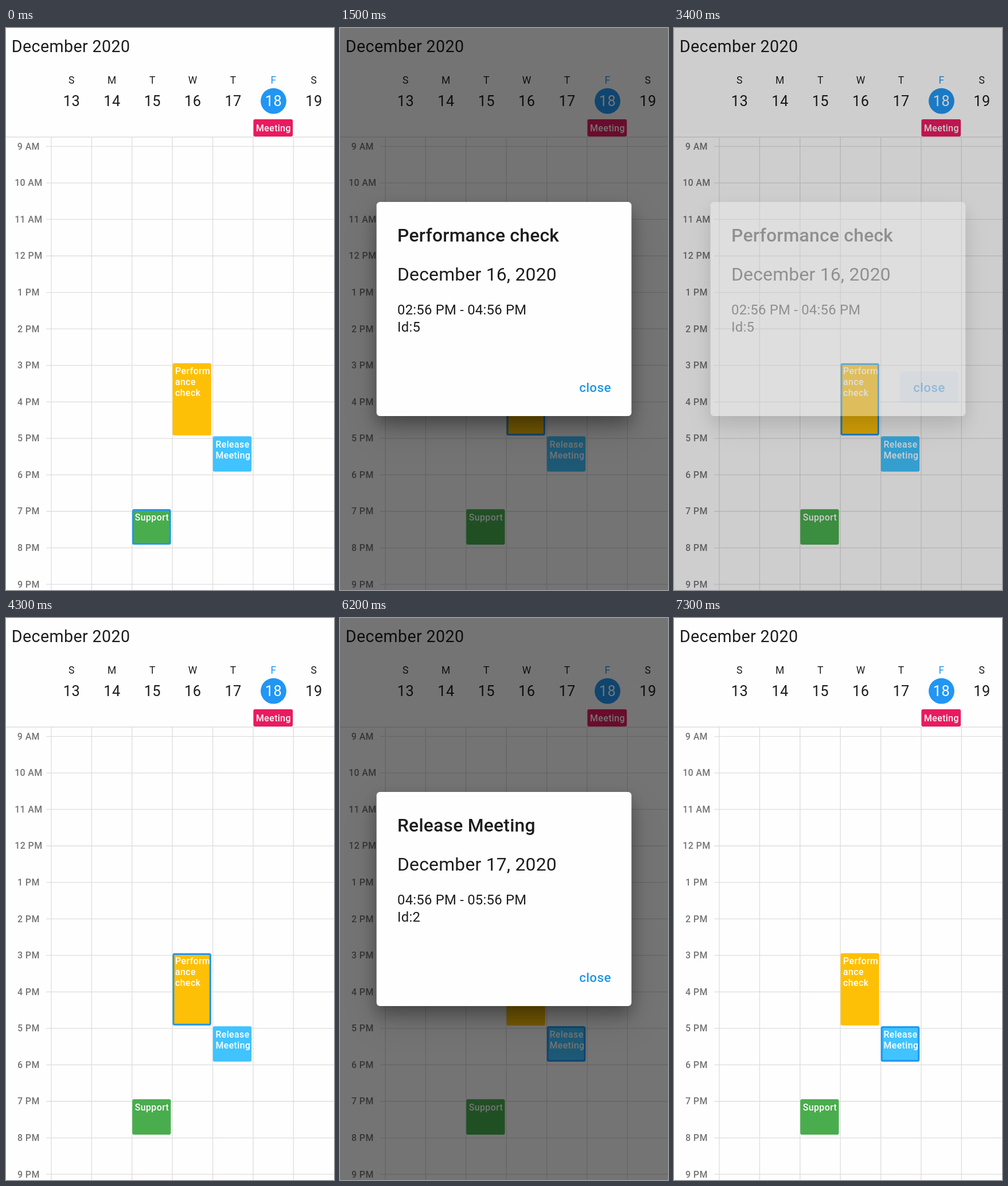
An HTML page that plays this animation: 572 by 979 pixels, repeating every 8 s.

```html
<!DOCTYPE html>
<html lang="en">
<head>
<meta charset="utf-8">
<title>Week calendar</title>
<style>
  html, body { margin: 0; width: 100%; height: 100%; overflow: hidden; background: #fefefe; }
  svg { display: block; width: 100%; height: 100%; }
  text { font-family: Roboto, sans-serif; letter-spacing: .4px; fill: #1d1d1d; white-space: pre; }
  .middle { text-anchor: middle; }
  .heading { font-size: 28.6px; }
  .weekday { font-size: 17.5px; }
  .date { font-size: 25.4px; }
  .hour { font-size: 15.9px; font-weight: 500; fill: #747474; }
  .event { font-size: 15.9px; font-weight: 500; fill: #fff; }
  .grid { stroke: #e0dcdd; stroke-width: 1.3; }
  .selection { fill: none; stroke: #2196f3; stroke-width: 3; }
  #dialog text { letter-spacing: .24px; }
  #dialog .large { font-size: 31.8px; }
  #dialog .bold { font-weight: 500; }
  #dialog .body { font-size: 23.85px; }
  #dialog .button { font-size: 22.3px; font-weight: 500; letter-spacing: .4px; fill: #2196e3; }
  .card { fill: #fefefe; filter: drop-shadow(0 14px 14px rgba(0,0,0,.3)) drop-shadow(0 22px 26px rgba(0,0,0,.14)); }
</style>
</head>
<body>
<svg viewBox="0 0 572 979" preserveAspectRatio="none">
  <g id="calendar"></g>
  <rect id="barrier" width="572" height="979"/>
  <g id="dialog">
    <rect class="card" x="63.7" y="303" width="444.6" height="373" rx="6"/>
    <rect id="press" x="394" y="598" width="102" height="55" rx="5" fill="#2196f3" opacity=".1"/>
    <text class="large bold" id="title" x="100" y="371.5"></text>
    <text class="large" id="day" x="100" y="440"></text>
    <text class="body" id="hours" x="100" y="498.5"></text>
    <text class="body" id="ident" x="100" y="528.5"></text>
    <text class="button" x="417.2" y="633.5">close</text>
  </g>
</svg>
<script>
const LOOP = 8000, STEP = 100, FADE = 150;
const BLUE = '#2196f3';
const COLUMN = 70.4, ROW = 63.57, GRID_LEFT = 79, GRID_TOP = 190, FIRST_HOUR = 206.3;

const byId = id => document.getElementById(id);
const calendar = byId('calendar');

function add(tag, attributes, content = '') {
  const node = document.createElementNS('http://www.w3.org/2000/svg', tag);
  for (const [key, value] of Object.entries(attributes)) node.setAttribute(key, value);
  node.textContent = content;
  calendar.append(node);
  return node;
}

const line = (x1, y1, x2, y2) => add('line', { class: 'grid', x1, y1, x2, y2 });

const events = [
  { x: 431.4, y: 159, w: 68.8, h: 30, color: '#e91b60', lines: ['Meeting'], baseline: 179.6 },
  { x: 290.5, y: 584, w: 67.3, h: 125.7, color: '#fdc007', lines: ['Perform', 'ance', 'check'] },
  { x: 360.8, y: 711.2, w: 67.4, h: 61.6, color: '#40c3ff', lines: ['Release', 'Meeting'] },
  { x: 220.2, y: 838.3, w: 67.3, h: 61.7, color: '#49ad4e', lines: ['Support'] },
];
const [, CHECK, RELEASE, SUPPORT] = events;

const visits = [
  { event: CHECK, open: 1280, close: 3280, press: 3200,
    title: 'Performance check', day: 'December 16, 2020', hours: '02:56 PM - 04:56 PM', ident: 'Id:5' },
  { event: RELEASE, open: 4330, close: 6580, press: 6600,
    title: 'Release Meeting', day: 'December 17, 2020', hours: '04:56 PM - 05:56 PM', ident: 'Id:2' },
];

function buildCalendar() {
  add('rect', { width: 572, height: 979, fill: '#fefefe' });
  add('text', { class: 'heading', x: 9.8, y: 42.3 }, 'December 2020');

  line(0, GRID_TOP, 572, GRID_TOP);
  [...'SMTWTFS'].forEach((letter, i) => {
    const x = 114.5 + COLUMN * i, today = i === 5;
    const left = GRID_LEFT + COLUMN * i;
    line(left, GRID_TOP, left, 979);
    if (today) add('circle', { cx: x, cy: 127.2, r: 22.4, fill: BLUE });
    add('text', { class: 'weekday middle', x, y: 97, style: today ? `fill:${BLUE}` : '' }, letter);
    add('text', { class: 'date middle', x, y: 135.7, style: today ? 'fill:#fff' : '' }, 13 + i);
  });

  for (let i = 0; i <= 12; i++) {
    const y = FIRST_HOUR + ROW * i, hour = 9 + i;
    line(70, y, 572, y);
    add('text', { class: 'hour middle', x: 39.4, y: y + 5.4 },
      `${(hour - 1) % 12 + 1} ${hour < 12 ? 'AM' : 'PM'}`);
  }

  for (const { x, y, w, h, color, lines, baseline = y + 19.3 } of events) {
    add('rect', { x, y, width: w, height: h, rx: 3, fill: color });
    lines.forEach((words, i) =>
      add('text', { class: 'event', x: x + 4.6, y: baseline + 19 * i }, words));
  }
}

buildCalendar();
const selection = add('rect', { class: 'selection', rx: 2 });

function select({ x, y, w, h }) {
  const box = { x: x + 1.5, y: y + 1.5, width: w - 3, height: h - 3 };
  for (const key in box) selection.setAttribute(key, box[key]);
}

const clamp = v => Math.min(1, Math.max(0, v));
const easeOut = v => 1 - (1 - v) ** 1.9;

function render(time) {
  const t = Math.floor(time % LOOP / STEP) * STEP;
  const visit = visits.findLast(v => t >= v.open);
  select(visit ? visit.event : SUPPORT);

  let shown = 0;
  if (visit) {
    shown = easeOut(Math.min(clamp((t - visit.open) / FADE), clamp(1 - (t - visit.close) / FADE)));
    for (const key of ['title', 'day', 'hours', 'ident']) byId(key).textContent = visit[key];
    byId('press').style.display = t >= visit.press ? '' : 'none';
  }
  byId('barrier').setAttribute('opacity', .54 * shown);
  byId('dialog').setAttribute('opacity', shown);
}

const start = performance.now();
function tick() {
  render(performance.now() - start);
  requestAnimationFrame(tick);
}
tick();
</script>
</body>
</html>
```
